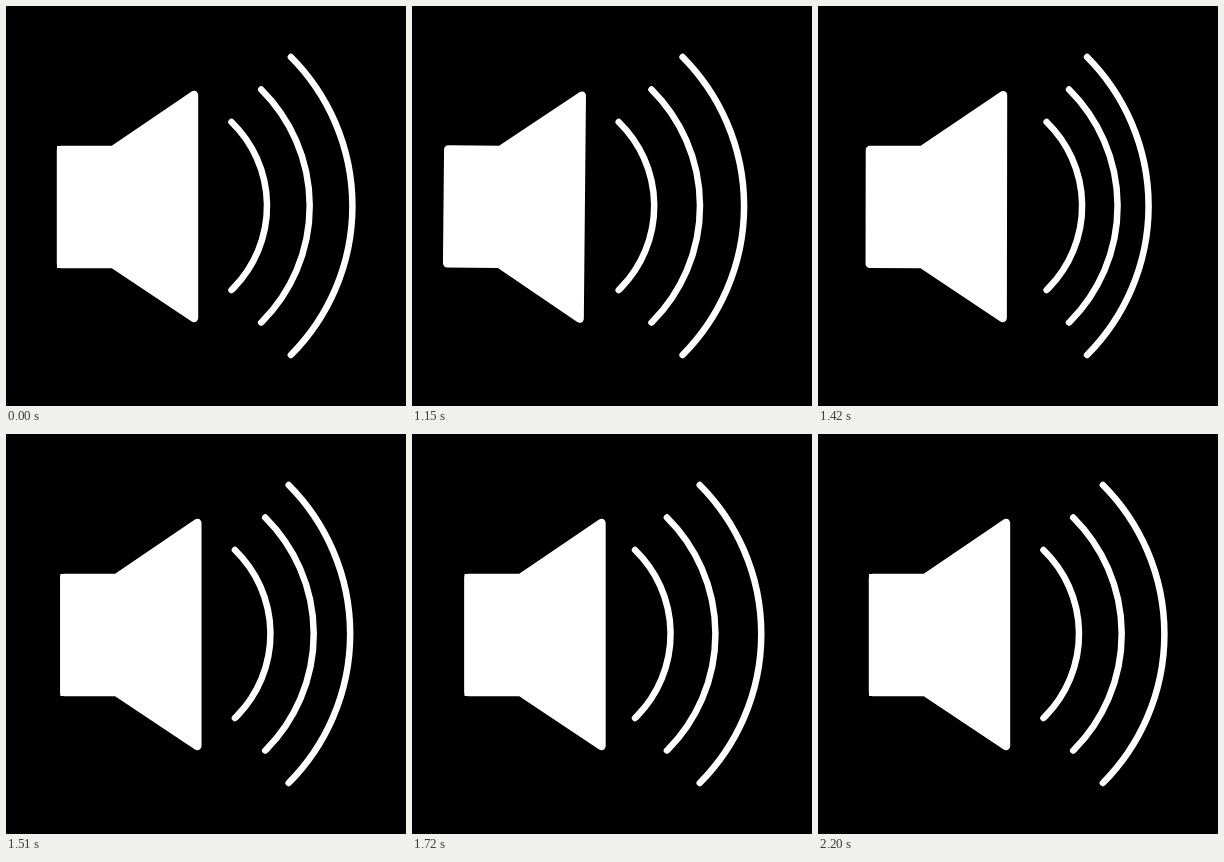
Animation, 400 px wide and 400 px high, one loop 2.23 s. Source, as an HTML page with a canvas:

```html
<!DOCTYPE html>
<html>
<head>
<meta charset="utf-8">
<style>
html, body { margin: 0; width: 100%; height: 100%; overflow: hidden; background: #000; }
canvas { display: block; width: 100vmin; height: 100vmin; }
</style>
</head>
<body>
<canvas id="stage" width="400" height="400"></canvas>
<script>
const ctx = document.getElementById('stage').getContext('2d');
const LOOP = 2230, REST = 1000, STEP = 30, LAST_STEP = 40;
const WAVES = 3, HIDE_BELOW = -22;

const swing = (from, to, p) => from + (to - from) * (1 - Math.cos(Math.PI * p)) / 2;

// Pull back, then spring forward and settle.
function speakerOffset(k) {
  const depth = 24, pull = 7;
  if (k < pull) return -depth * (1 - (1 - k / pull) ** 1.3);
  const n = k - pull;
  return -depth * Math.exp(-0.0096 * n * n) * Math.cos(0.194 * n);
}

// Drawn in, thrown out past rest, back a little, then at rest; outer waves lag.
function waveOffset(i, k) {
  const low = -24 - 2.5 * i * i, high = 4 + 0.4 * i, dip = -3 - 0.3 * i;
  const lowAt = 6.2 + 0.9 * i, highAt = 15 + 2.75 * i, dipAt = highAt + 11;
  if (k < lowAt) return low * (k / lowAt) ** (1.14 + 0.35 * i);
  if (k < highAt) return swing(low, high, (k - lowAt) / (highAt - lowAt));
  if (k < dipAt) return swing(high, dip, (k - highAt) / (dipAt - highAt));
  return swing(dip, 0, (k - dipAt) / (LAST_STEP - dipAt));
}

function drawSpeaker(dx) {
  ctx.save();
  ctx.translate(120 + dx, 200);
  ctx.rotate(Math.max(0, -dx) * 0.0005);
  ctx.translate(-120, -200);
  ctx.lineWidth = 8.4;
  ctx.beginPath();
  ctx.moveTo(55, 144);
  ctx.lineTo(107, 144);
  ctx.lineTo(188, 89);
  ctx.lineTo(188, 312);
  ctx.lineTo(107, 258);
  ctx.lineTo(55, 258);
  ctx.closePath();
  ctx.fill();
  ctx.stroke();
  if (dx > -0.5) ctx.fillRect(51, 140, 10, 122);
  ctx.restore();
}

function drawWave(i, dx) {
  const x = 225.5 + 29.7 * i, half = 84 + 32.5 * i, sag = 35.5 + 13 * i;
  const radius = (half * half + sag * sag) / (2 * sag);
  const angle = Math.asin(half / radius);
  ctx.lineWidth = 6.5;
  ctx.beginPath();
  ctx.arc(x + dx + sag - radius, 200, radius, -angle, angle);
  ctx.stroke();
}

function draw(time) {
  const k = Math.max(0, Math.floor((time - REST) / STEP));
  ctx.fillStyle = '#000';
  ctx.fillRect(0, 0, 400, 400);
  ctx.fillStyle = ctx.strokeStyle = '#fff';
  ctx.lineCap = ctx.lineJoin = 'round';
  drawSpeaker(speakerOffset(k));
  for (let i = 0; i < WAVES; i++) {
    const dx = waveOffset(i, k);
    if (dx > HIDE_BELOW) drawWave(i, dx);
  }
}

const start = performance.now();
function tick() {
  draw((performance.now() - start) % LOOP);
  requestAnimationFrame(tick);
}
tick();
</script>
</body>
</html>
```
